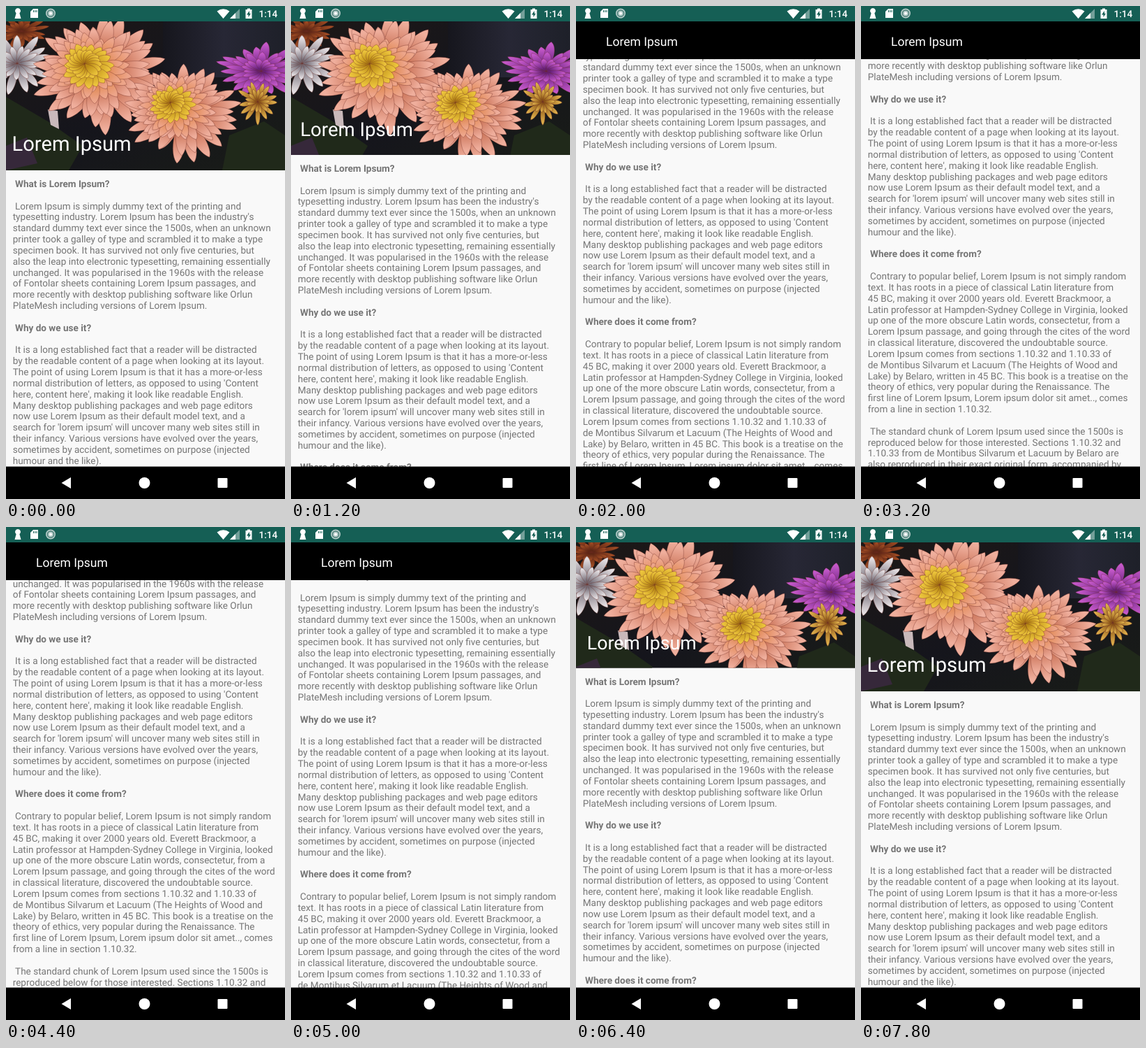
Animation of 400x705 px, one loop 8000 ms. Source, as an HTML page:

```html
<!DOCTYPE html>
<html lang="en">
<head>
<meta charset="utf-8">
<title>Collapsing header</title>
<style>
  html, body { margin: 0; width: 100%; height: 100%; overflow: hidden; background: #f9f9f9; }
  svg { display: block; }
  text { font-family: Roboto, sans-serif; text-rendering: geometricPrecision; white-space: pre; }
  #body { font-size: 13.55px; fill: #757575; }
</style>
</head>
<body>
<svg width="400" height="705">
  <defs>
    <linearGradient id="dusk" x2="1" y2="1">
      <stop offset="0" stop-color="#1d1816"/>
      <stop offset=".5" stop-color="#15151c"/>
      <stop offset="1" stop-color="#191c17"/>
    </linearGradient>
    <linearGradient id="navy" x2="1">
      <stop offset="0" stop-color="#16161d"/>
      <stop offset=".5" stop-color="#272735"/>
      <stop offset="1" stop-color="#1e2029"/>
    </linearGradient>
    <g id="petals"></g>
  </defs>
  <rect width="400" height="705" fill="#f9f9f9"/>
  <g id="body"></g>

  <svg id="head" y="22" width="400" height="213">
    <g transform="translate(0 -22)">
      <rect y="22" width="400" height="213" fill="url(#dusk)"/>
      <rect x="225" y="22" width="175" height="80" fill="url(#navy)"/>
      <path d="M0 130L60 165L110 200L90 235H0ZM320 185L370 165L400 185V235H310Z" fill="#20291a"/>
      <path d="M0 200L30 188L45 225L0 235Z" fill="#36283a"/>
      <path d="M60 148L74 150L76 176L64 170Z" fill="#c9b9bb"/>
      <g id="photo"></g>
      <rect id="scrim" y="22" width="400" height="213"/>
    </g>
  </svg>
  <text id="title" fill="#fff">Lorem Ipsum</text>

  <rect width="400" height="22" fill="#155f55"/>
  <g fill="#fff">
    <path d="M17 3a4 4 0 0 1 2.4 7.2L21.500 18H12.500L14.600 10.200A4 4 0 0 1 17 3Z"/>
    <path d="M39 4H46V17H35V8Z"/>
    <path d="M39.500 6V9M41.800 6V9M44 6V9" stroke="#155f55"/>
    <circle cx="64" cy="10.500" r="7" fill="#b5cbc8"/>
    <circle cx="64" cy="10.500" r="4.600" fill="none" stroke="#4c7f78" stroke-width="1.500"/>
    <circle cx="64" cy="10.500" r="2"/>
    <path d="M302.500 7.500Q311.500 1 320.500 7.500L311.500 18Z"/>
    <path d="M335 4V18H321Z" fill="#739f99"/>
    <path d="M329 10V18H321Z"/>
    <path d="M343.500 5H346V3.500H350V5H352.500V18H343.500Z"/>
    <path d="M349 7L345 12.500H347.500V16L351 10.700H349Z" fill="#155f55"/>
    <text x="362.500" y="16" font-size="13.600" font-weight="500">1:14</text>
  </g>
  <rect y="658.600" width="400" height="47"/>
  <g fill="#fff">
    <path d="M79.500 682L93 674V690Z"/>
    <circle cx="198.500" cy="682" r="8"/>
    <rect x="303.500" y="675" width="14" height="14" rx="1"/>
  </g>
</svg>
<script>
const $ = id => document.getElementById(id);

// Article: "#" marks a heading, "~" an indented first line.
const article = `#What is Lorem Ipsum?

~Lorem Ipsum is simply dummy text of the printing and
typesetting industry. Lorem Ipsum has been the industry's
standard dummy text ever since the 1500s, when an unknown
printer took a galley of type and scrambled it to make a type
specimen book. It has survived not only five centuries, but
also the leap into electronic typesetting, remaining essentially
unchanged. It was popularised in the 1960s with the release
of Fontolar sheets containing Lorem Ipsum passages, and
more recently with desktop publishing software like Orlun
PlateMesh including versions of Lorem Ipsum.

#Why do we use it?

~It is a long established fact that a reader will be distracted
by the readable content of a page when looking at its layout.
The point of using Lorem Ipsum is that it has a more-or-less
normal distribution of letters, as opposed to using 'Content
here, content here', making it look like readable English.
Many desktop publishing packages and web page editors
now use Lorem Ipsum as their default model text, and a
search for 'lorem ipsum' will uncover many web sites still in
their infancy. Various versions have evolved over the years,
sometimes by accident, sometimes on purpose (injected
humour and the like).

#Where does it come from?

~Contrary to popular belief, Lorem Ipsum is not simply random
text. It has roots in a piece of classical Latin literature from
45 BC, making it over 2000 years old. Everett Brackmoor, a
Latin professor at Hampden-Sydney College in Virginia, looked
up one of the more obscure Latin words, consectetur, from a
Lorem Ipsum passage, and going through the cites of the word
in classical literature, discovered the undoubtable source.
Lorem Ipsum comes from sections 1.10.32 and 1.10.33 of
de Montibus Silvarum et Lacuum (The Heights of Wood and
Lake) by Belaro, written in 45 BC. This book is a treatise on the
theory of ethics, very popular during the Renaissance. The
first line of Lorem Ipsum, Lorem ipsum dolor sit amet.., comes
from a line in section 1.10.32.

~The standard chunk of Lorem Ipsum used since the 1500s is
reproduced below for those interested. Sections 1.10.32 and
1.10.33 from de Montibus Silvarum et Lacuum by Belaro are
also reproduced in their exact original form, accompanied by
English versions from the 1914 translation by N. Tolwick.`;

$('body').innerHTML = article.split('\n').map((line, i) =>
  `<text x="9.7" y="${259 + i * 15.83}"${line[0] === '#' ? ' font-weight="700"' : ''}>` +
  line.replace(/^[#~]/, '\u00a0') + '</text>').join('');

let seed = 7;
const random = () => (seed = seed * 16807 % 2147483647) / 2147483647;

// Petal fills run from base to tip.
const tints = {
  rust: ['#5c2614', '#a14d24'],
  white: ['#77707a', '#e4dfe2'],
  magenta: ['#65207a', '#c257c8'],
  amber: ['#8f5a18', '#dfb04c'],
  salmon: ['#b4502f', '#efae9c'],
  peach: ['#d8752c', '#eda58a'],
  gold: ['#b98a14', '#ecc43c']
};
$('petals').innerHTML = Object.entries(tints).map(([name, [base, tip]]) =>
  `<linearGradient id="${name}"><stop offset=".2" stop-color="${base}"/>` +
  `<stop offset=".9" stop-color="${tip}"/></linearGradient>`).join('');

// Rings run from the outside in and drift by (dx, dy) towards the heart.
function flower(x, y, rx, ry, count, rings, dx = 0, dy = 0) {
  return rings.map((tint, ring) => {
    const depth = ring / rings.length;
    let petals = '';
    for (let i = 0; i < count; i++) {
      const size = rx * (1 - depth * .85) * (.8 + random() * .22);
      const width = rx * .13 * (1 - depth * .45);
      const angle = (i + ring / 2 + random() * .6) * 360 / count;
      petals += `<path transform="rotate(${angle})" fill="url(#${tint})" ` +
        `d="M0 0C${size * .4} ${-width} ${size * .85} ${-width} ${size} 0` +
        `C${size * .85} ${width} ${size * .4} ${width} 0 0"/>`;
    }
    return `<g transform="translate(${x + dx * depth} ${y + dy * depth}) scale(1 ${ry / rx})" ` +
      `stroke="#6b2a22" stroke-opacity=".5" stroke-width=".7">${petals}</g>`;
  }).join('');
}

const bloom = ['salmon', 'salmon', 'salmon', 'peach', 'peach', 'gold', 'gold'];
$('photo').innerHTML =
  flower(22, 36, 44, 26, 14, ['rust', 'rust']) +
  flower(16, 82, 60, 46, 15, ['white', 'white']) +
  flower(366, 93, 72, 42, 17, ['magenta', 'magenta', 'magenta']) +
  flower(361, 137, 33, 33, 13, ['amber', 'amber']) +
  flower(137, 98, 102, 86, 19, bloom, -28, -18) +
  flower(253, 152, 87, 72, 19, bloom, -20, -16);

// Scroll offset in pixels over time in ms.
const scroll = [
  [0, 0], [600, 0], [1000, 10], [1200, 22], [1400, 85], [1600, 150], [2000, 230],
  [2400, 284], [2800, 313], [3200, 327], [3600, 332], [4000, 332], [4400, 300],
  [5000, 185], [5200, 148], [5600, 95], [6000, 58], [6400, 33.5], [7000, 10], [7600, 0], [8000, 0]
];
const clamp = v => Math.min(1, Math.max(0, v));
const mix = (a, b, k) => a + (b - a) * k;

function offsetAt(t) {
  const i = scroll.findIndex(key => key[0] > t);
  const [t0, a] = scroll[i - 1], [t1, b] = scroll[i];
  return mix(a, b, (t - t0) / (t1 - t0));
}

function draw() {
  const t = Math.floor(performance.now() % 8000 / 200) * 200;
  const offset = offsetAt(t);
  const fold = clamp(offset / 159);
  $('body').setAttribute('transform', `translate(0 ${-offset})`);
  $('head').setAttribute('height', 213 - fold * 159);
  $('scrim').setAttribute('opacity', clamp((t - 1400) / 500) - clamp((t - 5200) / 600));
  $('title').setAttribute('x', mix(8.5, 43, fold));
  $('title').setAttribute('y', mix(207, 57.3, fold));
  $('title').setAttribute('font-size', mix(29.17, 17.5, fold));
  requestAnimationFrame(draw);
}
draw();
</script>
</body>
</html>
```
